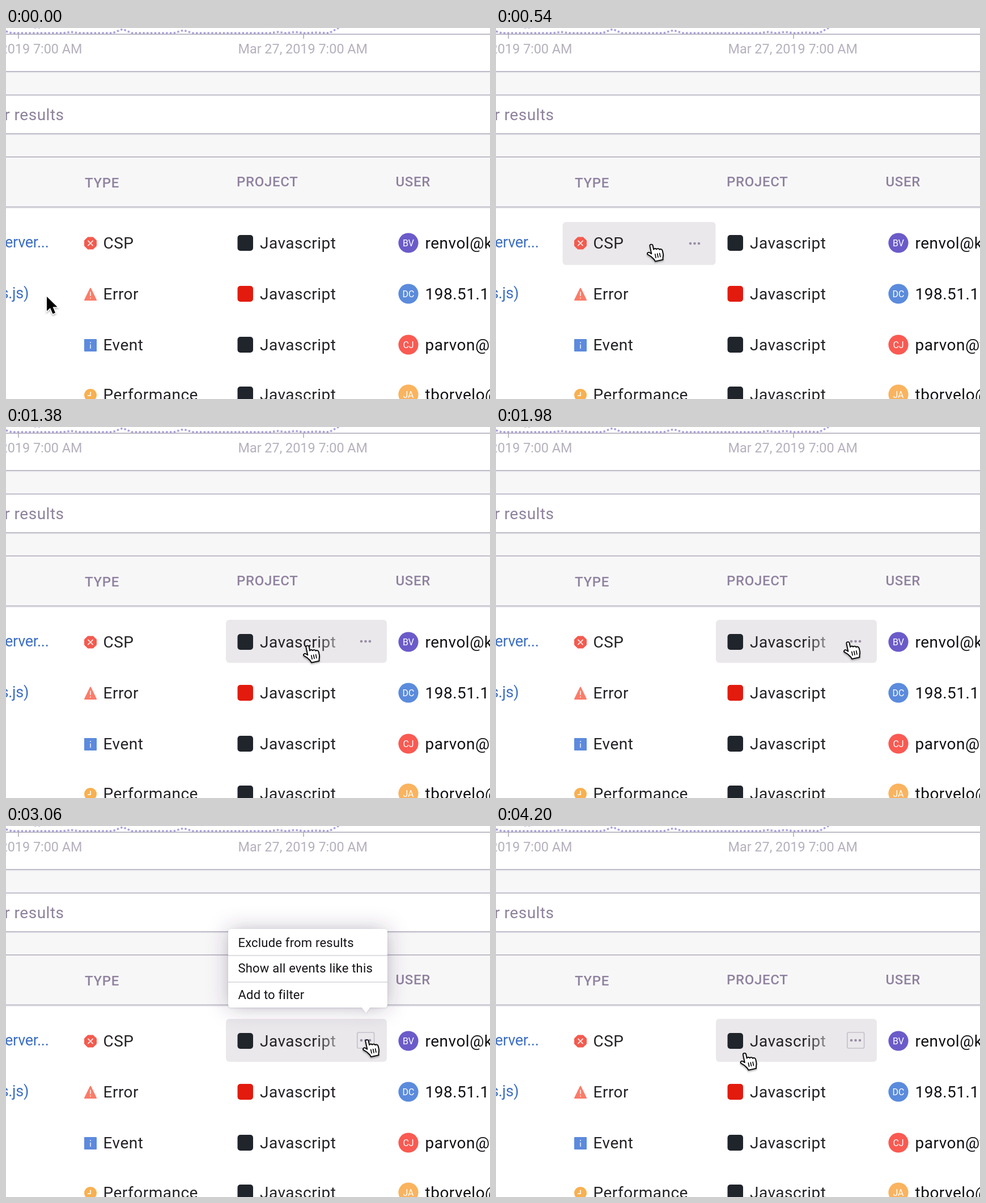
An HTML page that plays this animation: 854x656 px, repeating every 4260 ms.

```html
<!DOCTYPE html>
<html lang="en">
<head>
<meta charset="utf-8">
<title>Event table cell actions</title>
<style>
  html, body { margin: 0; width: 100%; height: 100%; overflow: hidden; background: #fff; }
  svg { display: block; width: 854px; height: 656px; }
  text { font: 28px Roboto, Arial, sans-serif; letter-spacing: .5px; fill: #242226; }
  .date { font-size: 23.4px; letter-spacing: 0; fill: #b5b0bd; }
  .search { fill: #8d819c; }
  .head { font-size: 24px; font-weight: 500; letter-spacing: .7px; fill: #8f829f; }
  .link { font-size: 27px; letter-spacing: -.3px; fill: #3d6fc4; }
  .user { fill: #121014; }
  .initials { font-size: 16px; letter-spacing: 0; fill: #fff; text-anchor: middle; }
  .menu text { font-size: 22px; letter-spacing: .2px; fill: #151217; }
  .end { text-anchor: end; }
  .rule { stroke: #bebac7; stroke-width: 1.8; }
  .soft { stroke: #f0eff2; stroke-width: 2; }
  .dots { fill: #988da5; }
</style>
</head>
<body>
<svg viewBox="0 0 854 656">
  <defs>
    <linearGradient id="fade">
      <stop offset="0" stop-color="#eae8eb" stop-opacity="0"/>
      <stop offset="1" stop-color="#eae8eb"/>
    </linearGradient>
    <filter id="menuShadow" x="-30%" y="-50%" width="160%" height="200%">
      <feDropShadow dx="0" dy="0" stdDeviation="18" flood-color="#45375a" flood-opacity=".3"/>
      <feDropShadow dx="0" dy="1" stdDeviation="1.5" flood-color="#45375a" flood-opacity=".15"/>
    </filter>
    <filter id="cursorShadow" x="-40%" y="-30%" width="180%" height="180%">
      <feDropShadow dx="0" dy="2" stdDeviation="1.5" flood-color="#000" flood-opacity=".35"/>
    </filter>
  </defs>

  <rect width="854" height="656" fill="#fff"/>
  <g fill="#f8f7f8">
    <rect y="77" width="854" height="41"/>
    <rect y="187" width="854" height="129"/>
  </g>
  <g id="rules"></g>

  <path d="M22 11V19M525 11V19" stroke="#b0abba" stroke-width="1.6"/>
  <path d="M0 6L10 9H100L115 7L130 9H188L206 2L222 9H296L313 4L330 9H466L480 7L494 9L510 7L526 9L548 8L570 9L590 -2M50 -1H62"
        fill="none" stroke="#a9a0dc" stroke-width="3.4" stroke-dasharray="3.4 3.4"/>
  <path d="M0 11H854" stroke="#aaa5b5" stroke-width="1.7"/>

  <text class="date end" x="134.5" y="45">Mar 26, 2019 7:00 AM</text>
  <text class="date" x="409.5" y="45">Mar 27, 2019 7:00 AM</text>
  <text class="search end" x="102.5" y="162.5">r results</text>
  <text class="head" x="139" y="282">TYPE</text>
  <text class="head" x="407" y="280">PROJECT</text>
  <text class="head" x="687.5" y="280">USER</text>
  <text class="link end" x="75.5" y="388">erver...</text>
  <text class="link end" x="40" y="478">s.js)</text>

  <g id="hovers"></g>
  <g id="rows"></g>

  <g transform="translate(149 380.5)">
    <path d="M-4.7 -11H4.7L11 -4.7V4.7L4.7 11H-4.7L-11 4.7V-4.7Z" fill="#f45a4e"/>
    <path d="M-4 -4L4 4M4 -4L-4 4" stroke="#ffe3df" stroke-width="1.8" stroke-linecap="round"/>
  </g>
  <g transform="translate(149 470.5)">
    <path d="M0 -10L10 10.5H-10Z" fill="#fb7c68" stroke="#fb7c68" stroke-width="2" stroke-linejoin="round"/>
    <path d="M0 -4V3.5M0 6V8" stroke="#ffe6e1" stroke-width="1.8"/>
  </g>
  <g transform="translate(149 561)">
    <rect x="-11" y="-11" width="22" height="22" rx="1" fill="#5c8add"/>
    <path d="M0 -6V-4M0 -1.5V6" fill="none" stroke="#dce8fb" stroke-width="1.7"/>
  </g>
  <g transform="translate(149 649)">
    <circle r="11" fill="#f8b050"/>
    <path d="M0 -5.5V1H-5" fill="none" stroke="#fff1da" stroke-width="2"/>
  </g>

  <rect id="veil" x="545" y="342" width="70" height="74" fill="url(#fade)"/>
  <g id="typeDots" class="dots"></g>
  <g id="projectDots" class="dots"></g>
  <rect id="button" x="619.8" y="365" width="29.8" height="28" rx="2.5" fill="none" stroke="#c5bfca" stroke-width="1.6"/>

  <g id="menu" class="menu">
    <path d="M398 182H667Q673 182 673 188V315Q673 321 667 321H642L635 330.5L628 321H398Q392 321 392 315V188Q392 182 398 182Z"
          fill="#fff" filter="url(#menuShadow)"/>
    <path d="M392 229H673M392 276H673" stroke="#d6d2da" stroke-width="1.6"/>
    <text x="409.5" y="213.5">Exclude from results</text>
    <text x="409.5" y="258.5">Show all events like this</text>
    <text x="409.5" y="305.5">Add to filter</text>
  </g>

  <g id="cursor" filter="url(#cursorShadow)">
    <path id="arrow" d="M0 0V25.5L6 20L10.6 30.5L15 28.6L10.6 18.3H18.5Z" fill="#000" stroke="#fff" stroke-width="2.6" paint-order="stroke"/>
    <g id="hand" transform="rotate(-12)" stroke="#000" stroke-width="1.8" stroke-linejoin="round" stroke-linecap="round">
      <path fill="#fff" d="M-2.6 2.4C-2.4 -.6 2.4 -.6 2.6 2.4V10C4 8 7 8.6 7.6 10.6C9.5 9.4 12 10 12.6 12.2C14.5 11 17.4 12.4 17.4 15.4V21C17.4 25 15 26.5 15 31H1C1 27 -2 25 -4.5 21L-9.4 16.5C-10.8 14 -7.8 12 -5.6 13.6L-2.6 16.5Z"/>
      <path d="M3.5 18.5V25M7.5 18.5V25M11.5 18.5V25" fill="none" stroke-width="1.6"/>
    </g>
  </g>
</svg>

<script>
const LOOP = 4260, STEP = 60;
const $ = id => document.getElementById(id);

function add(parent, tag, attrs, label) {
  const el = document.createElementNS("http://www.w3.org/2000/svg", tag);
  for (const key in attrs) el.setAttribute(key, attrs[key]);
  if (label) el.textContent = label;
  return parent.appendChild(el);
}

for (const y of [77, 118.5, 187, 228, 316.5]) {
  if (y !== 118.5 && y !== 228) add($("rules"), "path", { class: "soft", d: `M0 ${y + 2}H854` });
  add($("rules"), "path", { class: "rule", d: `M0 ${y}H854` });
}

const dark = "#20242b", red = "#e21b0e";
const rows = [
  [380, "CSP", dark, "BV", "#6b5bc9", "renvol@k.example"],
  [470, "Error", red, "DC", "#5b8bdc", "198.51.100.24"],
  [560, "Event", dark, "CJ", "#f95a52", "parvon@t.example"],
  [648, "Performance", dark, "JA", "#fab35e", "tborvelo@k.example"],
];
for (const [y, type, tile, initials, tint, user] of rows) {
  const g = add($("rows"), "g", { transform: `translate(0 ${y})` });
  add(g, "text", { x: 171.5, y: 10 }, type);
  add(g, "rect", { x: 408.5, y: -14, width: 27.5, height: 28, rx: 5, fill: tile });
  add(g, "text", { x: 448, y: 10 }, "Javascript");
  add(g, "circle", { cx: 710, cy: 0, r: 17.6, fill: tint });
  add(g, "text", { class: "initials", x: 710, y: 5.7 }, initials);
  add(g, "text", { class: "user", x: 739.5, y: 10 }, user);
}

const cell = (x, y, w) => add($("hovers"), "rect", { x, y, width: w, height: 76, rx: 6, fill: "#eae8eb" });
const typeCell = cell(117.5, 343, 270), projectCell = cell(388, 341, 284);

function drawDots(g, x, y) {
  for (const dx of [-7.5, 0, 7.5]) add(g, "circle", { cx: x + dx, cy: y, r: 2.3 });
}
drawDots($("typeDots"), 350.5, 381);
drawDots($("projectDots"), 634.5, 379);

// time, x, y of the pointer tip
const path = [
  [0, 72, 475], [540, 273.5, 382.5], [960, 273.5, 382.5], [1380, 531.5, 386.5],
  [1560, 531.5, 386.5], [1980, 620.5, 380], [2220, 636.5, 378], [3780, 636.5, 378],
  [4200, 438, 401.5], [4260, 438, 401.5],
];
const ease = u => u * u * (3 - 2 * u);
const ramp = (t, from, to) => Math.min(1, Math.max(0, (t - from) / (to - from)));

function pointer(t) {
  const i = path.findIndex(p => p[0] > t);
  const [t0, x0, y0] = path[i - 1], [t1, x1, y1] = path[i];
  const u = ease((t - t0) / (t1 - t0));
  return [x0 + (x1 - x0) * u, y0 + (y1 - y0) * u];
}

const show = (el, on) => el.setAttribute("visibility", on ? "visible" : "hidden");

function draw(t) {
  const [x, y] = pointer(t);
  const active = x > 117 && y < 419;
  const onType = active && x < 388, onProject = active && !onType;
  $("cursor").setAttribute("transform", `translate(${x} ${y})`);
  show($("arrow"), !active);
  show($("hand"), active);
  show(typeCell, onType);
  show($("typeDots"), onType);
  for (const el of [projectCell, $("veil"), $("projectDots")]) show(el, onProject);
  show($("button"), t >= 2220);
  $("menu").setAttribute("opacity", ramp(t, 2760, 2940) * (1 - ramp(t, 3720, 3840)));
}

const start = performance.now();
function tick() {
  const t = (performance.now() - start) % LOOP;
  draw(Math.floor(t / STEP) * STEP);
  requestAnimationFrame(tick);
}
tick();
</script>
</body>
</html>
```
